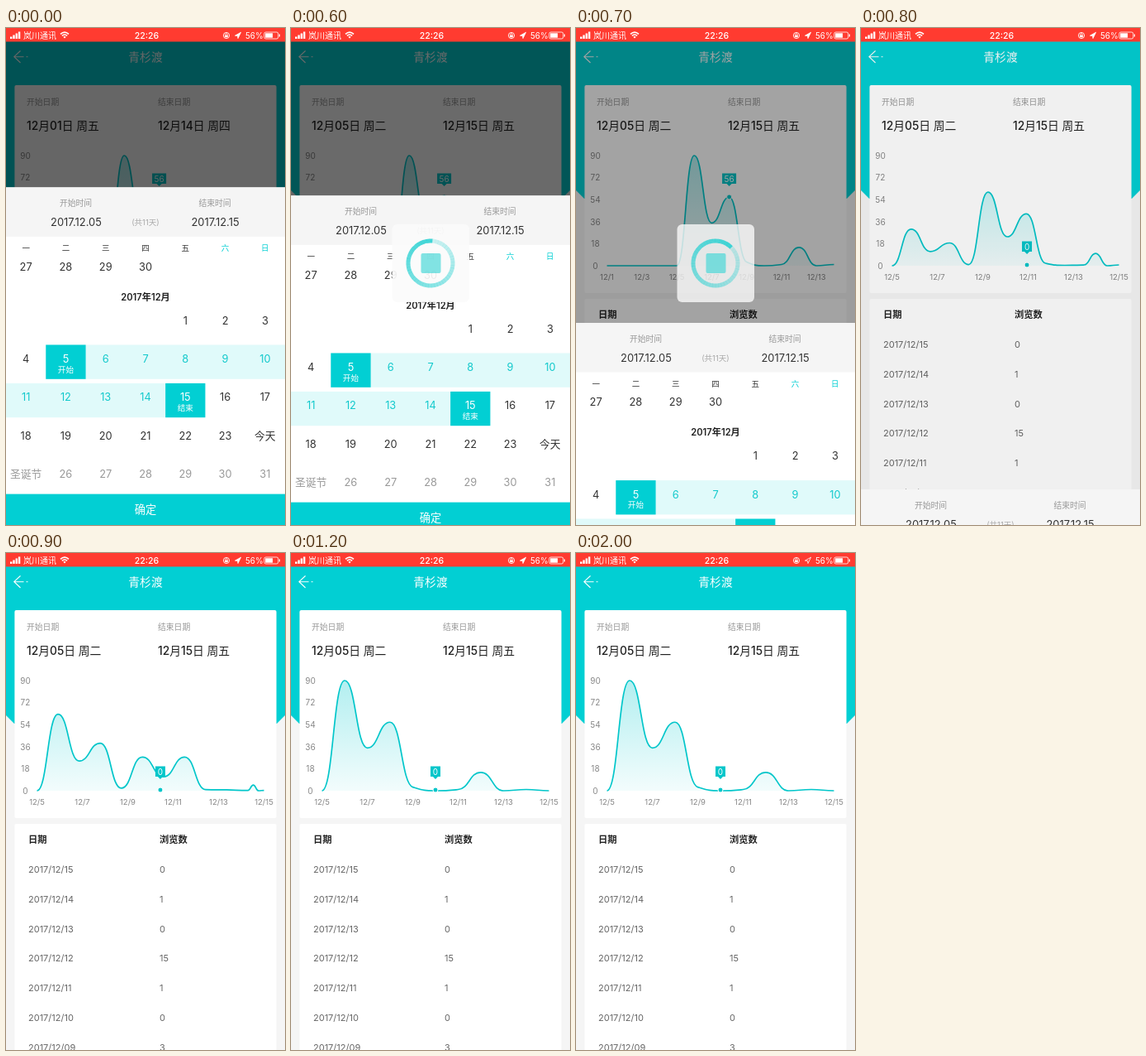
An HTML page that plays this animation: 338 px wide and 600 px high, repeating every 3000 ms.

```html
<!DOCTYPE html>
<html lang="zh-CN">
<head>
<meta charset="utf-8">
<title>日期选择</title>
<style>
  html, body { margin: 0; width: 100%; height: 100%; overflow: hidden; background: #f5f5f5; }
  svg { display: block; width: 338px; height: 600px; font-family: Inter, "Noto Sans CJK SC", "Noto Sans CJK", sans-serif; }
</style>
</head>
<body>
<svg id="stage" viewBox="0 0 338 600">
  <defs>
    <linearGradient id="fade" gradientUnits="userSpaceOnUse" x1="0" y1="154" x2="0" y2="287">
      <stop offset="0" stop-color="#00c9cd" stop-opacity=".3"/>
      <stop offset="1" stop-color="#00c9cd" stop-opacity=".05"/>
    </linearGradient>
  </defs>
  <rect width="338" height="600" fill="#f5f5f5"/>
  <path d="M0 0H338V196L328 206H10L0 196Z" fill="#02cfd3"/>
  <path d="M17.5 27.5 9.8 34.7 17.5 42M9.8 34.7H21.5M24.5 34.7H26.5" fill="none" stroke="#fff" stroke-width="1.1"/>
  <rect x="10.4" y="69" width="317.2" height="251" rx="2" fill="#fff"/>
  <rect x="10.4" y="327" width="317.2" height="280" rx="2" fill="#fff"/>
  <g id="page"></g>
  <path id="area" fill="url(#fade)"/>
  <path id="line" fill="none" stroke="#02c6ca" stroke-width="1.7" stroke-linejoin="round"/>
  <g id="oldTicks"></g>
  <g id="newTicks"></g>
  <g id="tip">
    <path id="bubble" fill="#02c6ca"/>
    <circle r="3" fill="#02c6ca" stroke="#fff"/>
    <text id="tipText" y="-18.3" font-size="10" fill="#fff" text-anchor="middle"></text>
  </g>
  <g id="oldDates"></g>
  <g id="newDates"></g>
  <rect id="dim" width="338" height="600"/>
  <g id="sheet"></g>
  <g id="loader">
    <rect id="panel" x="122.5" y="237" width="93.5" height="94" rx="6" fill="#fbfbfb"/>
    <g id="ring" fill="none" stroke="#1fcfd0" stroke-width="5"></g>
    <rect x="157.5" y="272" width="24" height="24" rx="2" fill="#3fd6d6" opacity=".65"/>
  </g>
  <g id="status"></g>
</svg>
<script>
const $ = id => document.getElementById(id);
const TEAL = '#02cfd3';

// Text placed by its vertical centre.
function text(str, x, y, size, fill, anchor = 'start', weight = 400) {
  return `<text x="${x}" y="${(y + size * 0.37).toFixed(2)}" font-size="${size}" fill="${fill}" ` +
    `text-anchor="${anchor}" font-weight="${weight}">${str}</text>`;
}
const mid = (str, x, y, size, fill, weight) => text(str, x, y, size, fill, 'middle', weight);
const rect = (x, y, w, h, fill) => `<rect x="${x}" y="${y}" width="${w}" height="${h}" fill="${fill}"/>`;

function buildPage() {
  let s = mid('青杉渡', 169, 35, 13.8, '#fff') +
    text('开始日期', 25, 89, 9.8, '#999') + text('结束日期', 184, 89, 9.8, '#999');
  for (let i = 0; i <= 5; i++) s += mid(i * 18, 23.5, 287 - i * 26.6, 10, '#888');
  s += text('日期', 27, 346, 11.3, '#222', 'start', 700) +
    text('浏览数', 186, 346, 11.3, '#222', 'start', 700);
  [0, 1, 0, 15, 1, 0, 3].forEach((views, i) => {
    const y = 382 + i * 35.8, day = String(15 - i).padStart(2, '0');
    s += text('2017/12/' + day, 27, y, 11, '#666') + text(views, 186, y, 11, '#666');
  });
  $('page').innerHTML = s;
}

function buildDates(id, from, to) {
  $(id).innerHTML = text(from, 25, 118, 13.8, '#222', 'start', 500) +
    text(to, 184, 118, 13.8, '#222', 'start', 500);
}

function buildTicks(id, first, last) {
  let s = '';
  for (let d = first; d <= last; d += 2)
    s += mid('12/' + d, 37.5 + (d - first) * 275 / (last - first), 300, 9.5, '#888');
  $(id).innerHTML = s;
}

// Date sheet, with its top edge at y = 0.
function buildSheet() {
  const w = 338 / 7, col = i => (i + 0.5) * w;
  let s = rect(0, 0, 338, 420, '#fff') + rect(0, 0, 338, 59.5, '#f5f5f5') +
    mid('开始时间', 84.5, 19.2, 9.8, '#999') + mid('结束时间', 253, 19.2, 9.8, '#999') +
    mid('2017.12.05', 85, 42, 12.9, '#333') + mid('2017.12.15', 253.5, 42, 12.9, '#333') +
    mid('(共11天)', 169, 42, 9.5, '#aaa');
  [...'一二三四五六日'].forEach((d, i) => s += mid(d, col(i), 73.4, 9.5, i > 4 ? TEAL : '#333'));
  for (let i = 0; i < 4; i++) s += mid(27 + i, col(i), 95.4, 12.8, '#333');
  s += mid('2017年12月', 169, 132, 11.2, '#222', 600);
  s += rect(w, 190.1, 6 * w, 41.3, '#e0fafa') + rect(0, 236.5, 4 * w, 41.3, '#e0fafa') +
    rect(w, 190.1, w, 41.3, TEAL) + rect(4 * w, 236.5, w, 41.3, TEAL);
  const special = { 24: '今天', 25: '圣诞节' }, ends = { 5: '开始', 15: '结束' };
  for (let d = 1; d <= 31; d++) {
    const cell = d + 3, x = col(cell % 7), y = 160.4 + Math.floor(cell / 7) * 46.4;
    const fill = ends[d] ? '#fff' : d > 5 && d < 15 ? '#12c9cc' : d > 24 ? '#999' : '#333';
    s += mid(special[d] || d, x, y, 12.8, fill);
    if (ends[d]) s += mid(ends[d], x, y + 13, 9.6, '#fff');
  }
  s += rect(0, 370.2, 338, 50, TEAL) + mid('确定', 169, 389, 13.2, '#fff');
  $('sheet').innerHTML = s;
}

function buildStatus() {
  let s = rect(0, 0, 338, 16.5, '#ff3b30');
  for (let i = 0; i < 4; i++) s += rect(5 + i * 3.3, 10.5 - i * 2, 2.4, 2.5 + i * 2, '#fff');
  s += text('岚川通讯', 21, 9, 10, '#fff') + mid('22:26', 170.5, 9, 10.6, '#fff', 500) +
    text('56%', 290, 9, 9.9, '#fff');
  s += `<g fill="none" stroke="#fff">
    <path d="M66 7.4Q71 2.8 76 7.4M67.9 9.4Q71 6.6 74.1 9.4" stroke-width="1.6"/>
    <circle cx="267" cy="9" r="3.6" stroke-width=".9"/>
    <path d="M265.8 8.8V7.8a1.2 1.2 0 0 1 2.4 0V8.8" stroke-width=".7"/>
    <path id="arrow" d="M277.5 9.2 284.6 5.2 281 12.6 280.6 9.4Z" stroke-width=".8"/>
    <rect x="312.8" y="5" width="17" height="8" rx="2" stroke-width=".8"/></g>
    <path d="M69.3 10.7Q71 9.3 72.7 10.7L71 12.6Z" fill="#fff"/>` +
    rect(265.2, 8.6, 3.6, 2.6, '#fff') + rect(314.1, 6.3, 9, 5.4, '#fff') + rect(330.7, 7.5, 1.2, 3, '#fff');
  $('status').innerHTML = s;
}

function buildRing() {
  const n = 48, at = a => `${(169 + 27 * Math.sin(a)).toFixed(2)} ${(284 - 27 * Math.cos(a)).toFixed(2)}`;
  let s = '';
  for (let i = 0; i < n; i++) {
    const a = -i / n * 2 * Math.PI, b = a - 2 * Math.PI / n - 0.01;
    s += `<path d="M${at(a)}A27 27 0 0 0 ${at(b)}" opacity="${(0.85 - 0.65 * i / n).toFixed(2)}"/>`;
  }
  $('ring').innerHTML = s;
}

const views = [0, 90, 35, 56, 3, 0, 1, 15, 0, 1, 0];
const oldViews = [0, 0, 0, 0, ...views.slice(0, 10)];
const lerp = (a, b, t) => a + (b - a) * t;

// Each old point glides to the new point of the same index; spare ones gather at the end.
function chartPoints(t) {
  return oldViews.map((v, i) => {
    const j = Math.min(i, 10);
    return [37.5 + lerp(i * 275 / 13, j * 27.5, t), 287 - lerp(v, views[j], t) * 133 / 90];
  });
}

// Monotone cubic curve.
function curve(p) {
  const slope = p.slice(1).map((q, i) => (q[1] - p[i][1]) / Math.max(q[0] - p[i][0], 0.01));
  const tangent = p.map((_, i) => {
    const a = slope[i - 1], b = slope[i];
    return a * b > 0 ? 2 * a * b / (a + b) : 0;
  });
  let d = `M${p[0]}`;
  for (let i = 1; i < p.length; i++) {
    const [x0, y0] = p[i - 1], [x1, y1] = p[i], h = (x1 - x0) / 2;
    d += `C${x0 + h} ${y0 + h * tangent[i - 1]} ${x1 - h} ${y1 - h * tangent[i]} ${x1} ${y1}`;
  }
  return d;
}

function drawChart(t) {
  const d = curve(chartPoints(t));
  $('line').setAttribute('d', d);
  $('area').setAttribute('d', d + 'V287H37.5Z');
  const moved = t > 0, w = moved ? 6 : 8.5;
  const x = moved ? lerp(214, 175, t) : 185.6, y = moved ? 286 : 204;
  $('tip').setAttribute('transform', `translate(${x} ${y})`);
  $('bubble').setAttribute('d', `M${-w}-28.5H${w}V-16H3L0-13L-3-16H${-w}Z`);
  $('tipText').textContent = moved ? 0 : 56;
}

// Start time, sheet top, dimming, loader panel opacity, ring angle.
const steps = [
  [0, 192.4, 0.6, 0, 0],
  [600, 202.4, 0.585, 0.92, 5],
  [700, 356, 0.36, 0.78, 45],
  [800, 557, 0.06, 0, 0],
  [900, 600, 0, 0, 0]
];

const show = (id, on) => $(id).setAttribute('visibility', on ? 'visible' : 'hidden');

let last = -1;
function draw(now) {
  const time = Math.floor(now % 3000 / 100) * 100;
  if (time !== last) {
    last = time;
    const [, top, dim, panel, angle] = steps.filter(s => s[0] <= time).pop();
    $('sheet').setAttribute('transform', `translate(0 ${top})`);
    $('dim').setAttribute('opacity', dim);
    show('loader', panel > 0);
    $('panel').setAttribute('opacity', panel);
    $('ring').setAttribute('transform', `rotate(${angle} 169 284)`);
    const u = Math.min(Math.max((time - 737) / 500, 0), 1);
    drawChart(time >= 1200 ? 1 : 1 - (1 - u) ** 3);
    show('oldDates', time < 600);
    show('newDates', time >= 600);
    show('oldTicks', time < 800);
    show('newTicks', time >= 800);
    $('arrow').setAttribute('fill', time < 2000 ? '#fff' : 'none');
  }
}

buildPage();
buildDates('oldDates', '12月01日 周五', '12月14日 周四');
buildDates('newDates', '12月05日 周二', '12月15日 周五');
buildTicks('oldTicks', 1, 14);
buildTicks('newTicks', 5, 15);
buildSheet();
buildStatus();
buildRing();

const start = performance.now();
function loop() {
  draw(performance.now() - start);
  requestAnimationFrame(loop);
}
loop();
</script>
</body>
</html>
```
